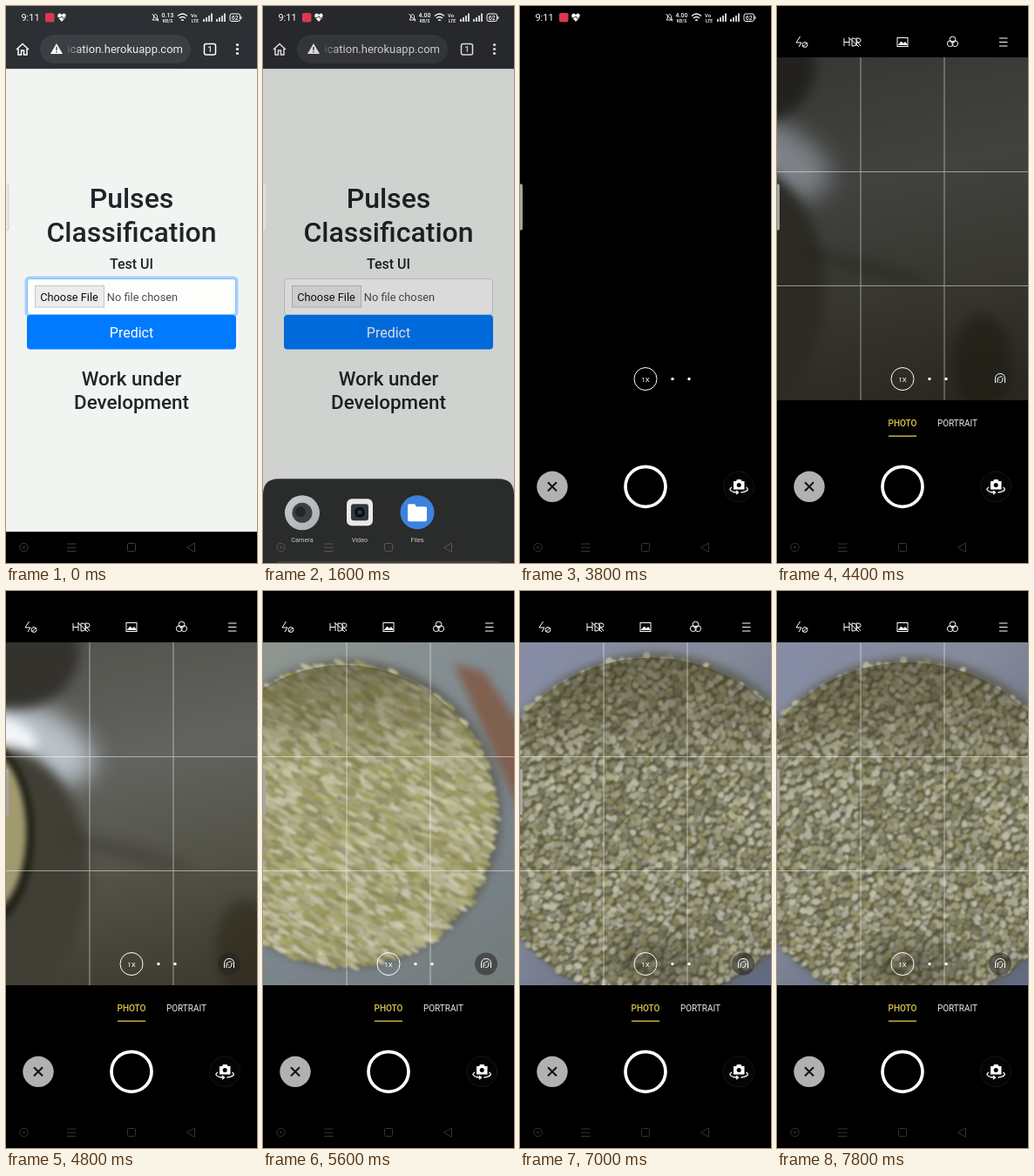
Recreate the animation shown at these times as an HTML page with a canvas. Size 288x640 px, loop 8000 ms.

```html
<!DOCTYPE html>
<html lang="en">
<head>
<meta charset="utf-8">
<title>Pulses Classification</title>
<style>
  html, body { margin: 0; width: 100%; height: 100%; overflow: hidden; background: #000; }
  canvas, svg { position: fixed; left: 0; top: 0; width: 100%; height: 100%; object-fit: contain; }
  text { font-family: Roboto, sans-serif; text-anchor: middle; }
  .line { fill: none; stroke: #fff; stroke-width: 1; }
  .bold { font-weight: 500; }
</style>
</head>
<body>
<canvas id="preview" width="288" height="640"></canvas>
<svg viewBox="0 0 288 640">
  <defs>
    <linearGradient id="fade" gradientUnits="userSpaceOnUse" x1="69" x2="88" y1="0" y2="0">
      <stop stop-color="#fff" stop-opacity=".1"/><stop offset="1" stop-color="#fff" stop-opacity=".9"/>
    </linearGradient>
    <linearGradient id="lens" x2="1" y2="1">
      <stop stop-color="#c9ccca"/><stop offset="1" stop-color="#a9aeb0"/>
    </linearGradient>
    <clipPath id="url"><rect x="71" y="36" width="138" height="28"/></clipPath>
  </defs>

  <g id="page">
    <rect width="288" height="640" fill="#f2f4f2"/>
    <rect width="288" height="72" fill="#2c2f33"/>
    <rect y="72" width="288" height="1" fill="#d5d7d5"/>
    <path class="line" d="M12 50L19 43.5L26 50M14 49V56H17.5V51H20.5V56H24V49" style="stroke-width:1.5"/>
    <rect x="39" y="33" width="173" height="33" rx="16.5" fill="#3b3e43"/>
    <path d="M58 43L65 55H51Z" fill="#fff"/>
    <path d="M58 47V51M58 52V53.5" stroke="#3b3e43" stroke-width="1.4"/>
    <g clip-path="url(#url)"><text x="203" y="54" font-size="13" fill="url(#fade)" style="text-anchor:end">ication.herokuapp.com</text></g>
    <rect class="line" x="227.5" y="43.5" width="13" height="12.5" rx="2" style="stroke-width:1.5"/>
    <text class="bold" x="234" y="53" font-size="9" fill="#fff">1</text>
    <g fill="#fff"><circle cx="265.5" cy="44.5" r="1.6"/><circle cx="265.5" cy="49.5" r="1.6"/><circle cx="265.5" cy="54.5" r="1.6"/></g>

    <g class="bold" fill="#212529">
      <text x="144" y="231.5" font-size="32">Pulses</text>
      <text x="144" y="270.5" font-size="32">Classification</text>
      <text x="144" y="302" font-size="16">Test UI</text>
      <text x="144" y="435.5" font-size="22.4">Work under</text>
      <text x="144" y="462.5" font-size="22.4">Development</text>
    </g>
    <rect id="focus" x="23" y="312" width="242" height="44" rx="4" fill="none" stroke="#a9d0fb" stroke-width="3"/>
    <rect id="field" x="24.5" y="313.5" width="239" height="41" rx="3" fill="#fdfefc"/>
    <rect x="33.5" y="321.5" width="79" height="24.5" fill="#ececec" stroke="#c6c6c6"/>
    <text x="72.5" y="338.5" font-size="12.8" fill="#111">Choose File</text>
    <text x="156.5" y="338.5" font-size="12.8" fill="#495057">No file chosen</text>
    <rect x="24" y="355" width="240" height="39.5" rx="4" fill="#007bff"/>
    <text x="144" y="380.5" font-size="16" fill="#fff">Predict</text>
    <rect y="604" width="288" height="36"/>
    <rect id="dim" width="288" height="640"/>
  </g>

  <g id="sheet">
    <path d="M0 660V484Q0 466 18 466H270Q288 466 288 484V660Z" fill="#2a2b2b"/>
    <circle cx="45" cy="505" r="20" fill="url(#lens)"/>
    <circle cx="45" cy="505" r="11.5" fill="#3b4044"/>
    <circle cx="43" cy="504" r="6" fill="#22282d"/>
    <rect x="96" y="489" width="30" height="31" rx="6" fill="#e9e9e7"/>
    <rect x="101" y="495" width="20" height="19" rx="3" fill="#33383c"/>
    <circle cx="111" cy="504.5" r="6" fill="#0c0f14"/>
    <circle cx="111" cy="504.5" r="2.5" fill="#23415c"/>
    <circle cx="177" cy="504.5" r="19.5" fill="#3d82df"/>
    <path d="M167 495H174L176 498H186Q188 498 188 500V513Q188 515 186 515H168Q166 515 166 513V496Z" fill="#fff"/>
    <g font-size="7.3" fill="#c9c9c9">
      <text x="45" y="539">Camera</text><text x="111" y="539">Video</text><text x="177" y="539">Files</text>
    </g>
    <path d="M16 561.5H272" stroke="#505151"/>
    <text x="144" y="588" font-size="13" fill="#fff">Cancel</text>
    <g id="touch">
      <circle cx="45" cy="505" r="20" opacity=".12"/>
      <circle cx="53" cy="509" r="8" fill="#eef2f3" opacity=".8"/>
    </g>
  </g>

  <g id="status" fill="#fff">
    <text x="28" y="17" font-size="11">9:11</text>
    <g transform="translate(0 -5)">
      <rect x="45" y="13" width="10.5" height="10.5" rx="2" fill="#dc3850"/>
      <path d="M64 23L59.5 18Q58.500 13.500 62 13.500L64 15L66 13.500Q69.500 13.500 68.500 18Z"/>
      <path d="M59 18.500H62.500L64 16.500L65.500 19.500L69 17" fill="none" stroke="#333" stroke-width=".9"/>
      <path class="line" d="M168 21H175L173.500 19V16.500Q171.500 12.500 169.500 16.500V19ZM167.500 14L175 22.500" style="stroke-width:.9"/>
      <text id="speed" class="bold" x="185.500" y="18" font-size="7">0.13</text>
      <text class="bold" x="185.500" y="23.500" font-size="5">KB/S</text>
      <path class="line" d="M197 16.500Q202.500 11.500 208 16.500M199 19Q202.500 16 206 19M201 21.500Q202.500 20.500 204 21.500" style="stroke-width:1.3"/>
      <text class="bold" x="215.500" y="18" font-size="6">Vo</text>
      <text class="bold" x="217" y="23.500" font-size="5">LTE</text>
      <path d="M227 23V20M230 23V18M233 23V16M236 23V13.500M242 23V20M245 23V18M248 23V16M251 23V13.500" stroke="#fff" stroke-width="1.6"/>
      <rect class="line" x="257" y="14" width="11.5" height="8.5" rx="2"/>
      <path d="M270 17V20" stroke="#fff"/>
      <text class="bold" x="262.7" y="21" font-size="7">62</text>
    </g>
  </g>

  <g id="finder">
    <path d="M96 59V453M192 59V453M0 190.500H288M0 321.500H288" stroke="#fff" opacity=".5"/>
    <g class="line">
      <path d="M26.500 35L22 42H28L25 47M34.500 42L29.500 47"/><circle cx="32" cy="44.500" r="2.900"/>
      <rect x="138" y="36.500" width="12" height="10"/><path d="M139 45L142.500 41L145 43.500L147 41.500L149.500 45" fill="#fff"/>
      <circle cx="201.500" cy="38.500" r="3.400"/><circle cx="198.800" cy="43.200" r="3.400"/><circle cx="204.200" cy="43.200" r="3.400"/>
      <path d="M255 37H264.500M255 41.500H264.500M255 46H264.500"/>
      <path d="M77 37V46M83 37V46M77 41.500H83M86 37V46H87Q92 45.500 92 41.500T87 37ZM91 46V37H93Q96 37 96 39.500T93 42H91M93 42L96 46M82 36L94 47"/>
    </g>
    <circle cx="256" cy="428.500" r="13" fill="#222" opacity=".55"/>
    <path class="line" d="M250.500 433V428Q251 422.500 256 422.500Q261.500 422.500 261.500 428V433M253 433V428Q255 426 258.500 425.500M255 432Q258 434 259 429V427M255 429V430"/>
    <g font-size="10" class="bold">
      <text x="144" y="482.500" fill="#d9c64a">PHOTO</text>
      <text x="207" y="482.500" fill="#eee" style="font-weight:400">PORTRAIT</text>
    </g>
    <path d="M128 494.200H160" stroke="#b5a53c" stroke-width="1.600"/>
  </g>

  <g id="controls">
    <circle class="line" cx="144" cy="428.500" r="13"/>
    <text x="144" y="431.500" font-size="8" fill="#fff">1X</text>
    <circle cx="175" cy="428.500" r="1.700" fill="#fff"/><circle cx="194" cy="428.500" r="1.700" fill="#fff"/>
    <circle cx="37" cy="552.300" r="17.700" fill="#b0b2b0"/>
    <path d="M32 547.300L42 557.300M42 547.300L32 557.300" stroke="#111" stroke-width="2"/>
    <circle cx="144" cy="552.300" r="23" fill="none" stroke="#fff" stroke-width="3.700"/>
    <circle cx="251" cy="552.300" r="17.500" fill="#040404" stroke="#161616"/>
    <path d="M245 546H248L249 544H253.500L254.500 546H257.500V555.500H245Z" fill="#fff"/>
    <circle cx="251.200" cy="550.500" r="2.500"/>
    <path class="line" d="M243 553Q238 556 245 558.500L250 559M248 557L250.500 559L248 561M259.500 553Q265 557 253.500 559" style="stroke-width:1.3"/>
  </g>

  <rect x="-1" y="204.500" width="4" height="53" rx="1.500" id="handle"/>
  <g id="nav" fill="none">
    <circle cx="20.500" cy="622" r="4.700"/><circle cx="20.500" cy="622" r="1"/>
    <path d="M70 618H80.500M70 622.300H80.500M70 626.500H80.500M216.500 617V627.500L207.500 622.200Z"/>
    <rect x="139.500" y="617.500" width="9" height="9" rx="1"/>
  </g>
</svg>

<script>
const DURATION = 8000, STEP = 200, TAU = Math.PI * 2;
const el = id => document.getElementById(id);
const canvas = el('preview'), ctx = canvas.getContext('2d');
const clamp = v => Math.max(0, Math.min(1, v));
const show = (id, on) => { el(id).style.display = on ? '' : 'none'; };
const set = (id, name, value) => el(id).setAttribute(name, value);

let seed = 911;
const random = () => (seed = (seed * 16807) % 2147483647) / 2147483647;

// Sunflower spacing covers the bowl evenly; the stride mixes the stacking order.
const GRAINS = 2500, GOLDEN_ANGLE = 2.39996;
const grains = Array.from({ length: GRAINS }, (_, i) => {
  const slot = (i * 1009) % GRAINS;
  const distance = Math.sqrt((slot + 0.5) / GRAINS), angle = slot * GOLDEN_ANGLE;
  return {
    x: Math.cos(angle) * distance + (random() - 0.5) * 0.03,
    y: Math.sin(angle) * distance + (random() - 0.5) * 0.03,
    tilt: random() * Math.PI, size: 0.8 + random() * 0.4,
    light: 42 + random() * 29, saturation: 8 + random() * 10
  };
});

// Each pose: time, centre x, centre y, radius, motion blur
const bowlPath = [
  [5200, 20, 270, 160, 1], [5400, 62, 262, 168, 1], [5600, 93, 258, 173, 1],
  [6000, 140, 264, 190, 0.3], [6400, 150, 268, 195, 0], [7800, 150, 277, 195, 0]
];

function bowlAt(time) {
  const next = Math.max(1, bowlPath.findIndex(p => p[0] >= time));
  const a = bowlPath[next - 1], b = bowlPath[next];
  const k = clamp((time - a[0]) / (b[0] - a[0]));
  return a.map((v, i) => v + (b[i] - v) * k);
}

function ellipse(x, y, rx, ry, fill, tilt = 0) {
  ctx.fillStyle = fill;
  ctx.beginPath();
  ctx.ellipse(x, y, rx, ry, tilt, 0, TAU);
  ctx.fill();
}

function gradient(x0, y0, x1, y1, ...colors) {
  const g = ctx.createLinearGradient(x0, y0, x1, y1);
  colors.forEach((c, i) => g.addColorStop(i / (colors.length - 1), c));
  return g;
}

function fillView(fill) {
  ctx.fillStyle = fill;
  ctx.fillRect(0, 59, 288, 394);
}

function soften(radius) {
  ctx.filter = `blur(${radius}px)`;
  ctx.drawImage(canvas, 0, 0);
  ctx.filter = 'none';
}

function drawTable(time) {
  fillView(gradient(120, 59, 200, 453, '#55544f', '#62645f', '#535247', '#3e3b30'));
  ctx.save();
  ctx.translate((time - 4800) * 0.1, 0);
  ctx.filter = 'blur(14px)';
  ellipse(10, 170, 95, 46, '#b9c2c9', 0.35);
  ctx.filter = 'blur(7px)';
  ellipse(8, 70, 76, 66, '#34322d');
  ellipse(-2, 168, 38, 22, '#f3f7fa', 0.3);
  ellipse(-5, 325, 100, 145, '#413f35');
  ellipse(140, 300, 75, 9, 'rgba(45,42,35,.3)', 0.25);
  ellipse(275, 410, 35, 55, 'rgba(45,40,25,.6)');
  ctx.filter = 'blur(3px)';
  ellipse(-23, 280, 56, 106, '#25241b');
  ellipse(-24, 277, 47, 94, '#a19a70');
  ctx.restore();
  fillView(`rgba(0,0,0,${1 - clamp((time - 4000) / 600)})`);
}

function drawBowl(time) {
  const [, x, y, r, blur] = bowlAt(time);
  const moving = blur > 0.5;
  fillView(moving
    ? gradient(0, 59, 288, 453, '#8f968f', '#7d8892', '#737b7a')
    : gradient(0, 59, 288, 300, '#868da6', '#858b9a', '#626b82'));
  ctx.save();
  ctx.filter = 'blur(5px)';
  if (blur > 0.2) {
    ctx.fillStyle = '#80604f';
    ctx.beginPath();
    ctx.moveTo(x + 126, 84);
    ctx.lineTo(x + 160, 92);
    ctx.lineTo(x + 212, 170);
    ctx.lineTo(x + 200, 250);
    ctx.fill();
  }
  ellipse(x + 4, y - 2, r + 4, r + 4, '#606159');
  ctx.restore();
  ellipse(x, y, r, r, moving ? '#87845d' : '#656349');
  for (const g of grains) {
    const gx = x + g.x * r, gy = y + g.y * r;
    const tilt = g.tilt * (1 - blur) + 0.52 * blur;
    const rx = (4.6 + 3.4 * blur) * g.size, ry = (3.6 - 0.9 * blur) * g.size;
    ellipse(gx + 0.8, gy + 1.3, rx, ry, `rgba(55,52,32,${0.7 - 0.5 * blur})`, tilt);
    ellipse(gx, gy, rx, ry, `hsl(57 ${g.saturation + 9 * blur}% ${g.light + 4 * blur}%)`, tilt);
  }
  soften(0.8 + 0.8 * blur);
  ctx.save();
  ctx.beginPath();
  ctx.arc(x, y, r, 0, TAU);
  ctx.clip();
  fillView(gradient(0, y - r, 0, y - r * 0.3, 'rgba(45,39,18,.45)', 'rgba(45,39,18,0)'));
  if (!moving) {
    ctx.filter = 'blur(12px)';
    ellipse(x + 10, y + 155, 62, 26, 'rgba(45,43,25,.4)');
  }
  ctx.restore();
}

function drawPreview(time) {
  ctx.clearRect(0, 0, 288, 640);
  if (time < 4200) return;
  ctx.save();
  ctx.beginPath();
  ctx.rect(0, 59, 288, 394);
  ctx.clip();
  time < 5200 ? drawTable(time) : drawBowl(time);
  ctx.restore();
}

function render(time) {
  const camera = time >= 3800, finder = time >= 4200, focused = time < 1400;
  const slide = 1 - clamp((time - 1400) / 600);
  show('page', !camera);
  show('sheet', !camera && time > 1400);
  show('controls', camera);
  show('finder', finder);
  show('status', !finder);
  show('focus', focused);
  show('touch', time >= 2600 && time < 2900);
  set('field', 'stroke', focused ? '#80bdff' : '#ced4da');
  set('dim', 'opacity', 0.42 * (1 - slide));
  set('sheet', 'transform', `translate(0 ${174 * slide ** 2})`);
  el('speed').textContent = time < 1600 ? '0.13' : '4.00';
  set('handle', 'fill', focused ? '#e9ebe9' : camera ? '#a5a5a5' : '#dedede');
  set('handle', 'stroke', focused ? '#d0d2d0' : 'none');
  set('nav', 'stroke', camera ? '#343434' : focused ? '#3c3c3c' : '#565656');
  drawPreview(time);
}

let shown = -1;
function tick(now) {
  const time = Math.floor((now % DURATION) / STEP) * STEP;
  if (time !== shown) render(shown = time);
  requestAnimationFrame(tick);
}
render(0);
requestAnimationFrame(tick);
</script>
</body>
</html>
```
